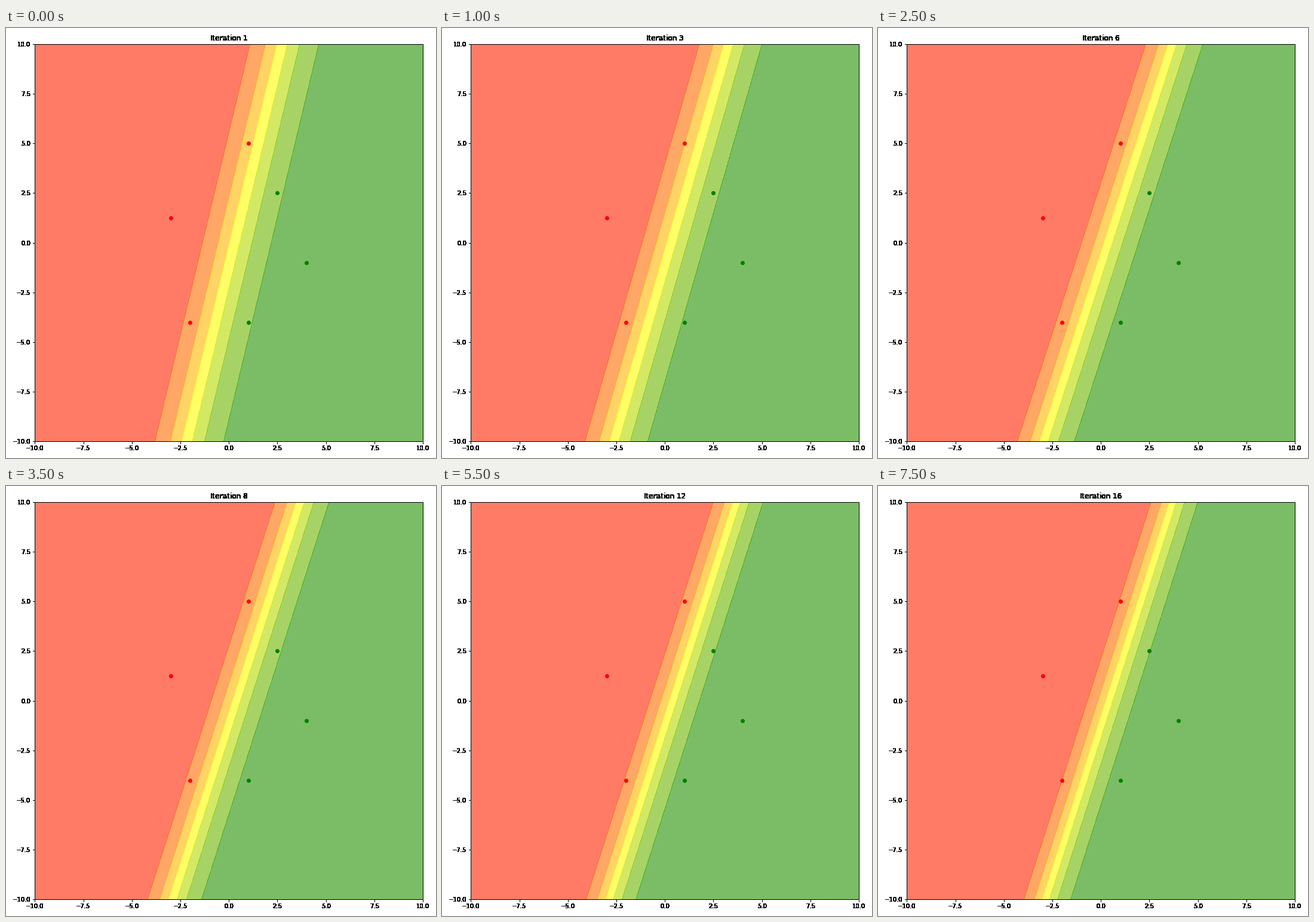
Animation, 720 px wide and 720 px high, one loop 8000 ms. Source, as a matplotlib script:

```python
import numpy as np
import matplotlib.pyplot as plt
from matplotlib.animation import FuncAnimation
from matplotlib.colors import LinearSegmentedColormap

SIZE, DPI = 720, 72
STEPS, INTERVAL = 16, 500
RATE = 0.5
START = (1.1095, -0.272, -0.225)  # weight x, weight y, bias

reds = np.array([(1, 5), (-3, 1.25), (-2, -4)])
greens = np.array([(2.5, 2.5), (4, -1), (1, -4)])
points = np.vstack([reds, greens])
labels = np.array([0, 0, 0, 1, 1, 1])
inputs = np.column_stack([points, np.ones(len(points))])


def sigmoid(z):
    return 1 / (1 + np.exp(-z))


def train():
    """Weights of a single neuron under squared-error gradient descent."""
    w = np.array(START)
    history = [w]
    for _ in range(STEPS - 1):
        p = sigmoid(inputs @ w)
        w = w - RATE * inputs.T @ ((p - labels) * p * (1 - p))
        history.append(w)
    return history


def harden(img, dpi):
    """Turn every touched pixel solid black, for crisp labels."""
    out = np.zeros_like(img)
    out[..., 3] = img[..., 3] > 0
    return out, 0, 0


history = train()
axis = np.linspace(-10, 10, 301)
gx, gy = np.meshgrid(axis, axis)
levels = np.arange(8) * 0.15
cmap = LinearSegmentedColormap.from_list("ryg", ["red", "yellow", "green"])

fig, ax = plt.subplots(figsize=(SIZE / DPI, SIZE / DPI), dpi=DPI,
                       facecolor="white")
ticks = np.linspace(-10, 10, 9)
ax.set(xlim=(-10, 10), ylim=(-10, 10), xticks=ticks, yticks=ticks)
ax.set_title("Iteration 1")
fig.tight_layout()

for spine in ax.spines.values():
    spine.set_linewidth(1)
for artist in (ax.xaxis, ax.yaxis, ax.title):
    artist.set_agg_filter(harden)

for group, color in ((reds, "red"), (greens, "green")):
    ax.scatter(*group.T, s=36, linewidths=1, color=color, zorder=2)

bands = None


def update(i):
    global bands
    if bands is not None:
        bands.remove()
    wx, wy, b = history[i]
    bands = ax.contourf(gx, gy, sigmoid(wx * gx + wy * gy + b),
                        levels=levels, cmap=cmap, alpha=0.6, zorder=1)
    ax.set_title(f"Iteration {i + 1}")
    return []


anim = FuncAnimation(fig, update, frames=STEPS, interval=INTERVAL,
                     repeat=True, repeat_delay=0, blit=False)
plt.show()
```
